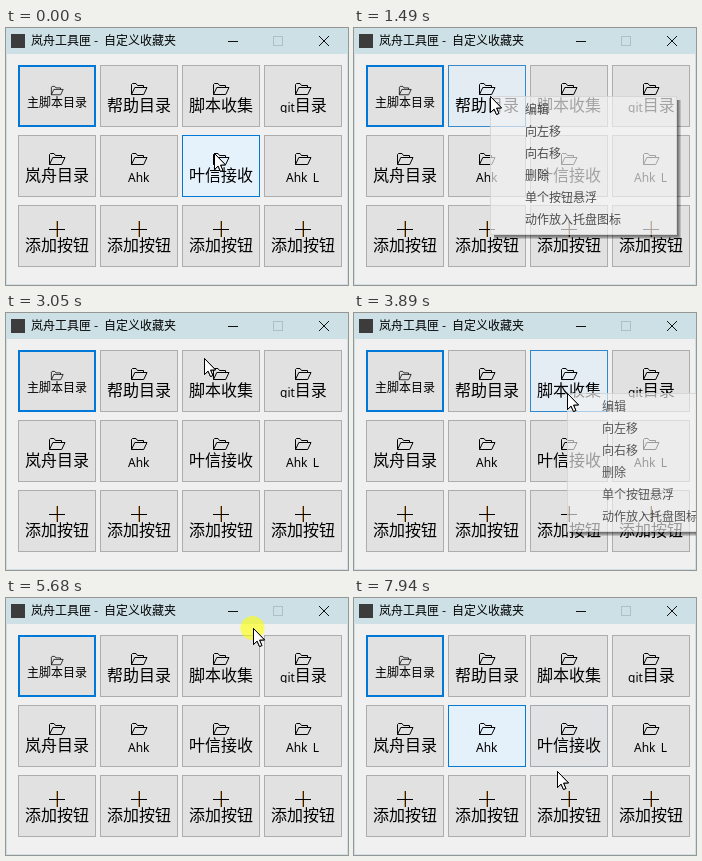
Write an HTML page with a canvas that moves like this. It is 342 px wide and 257 px high and loops after 8000 ms.

```html
<!DOCTYPE html>
<html lang="zh-CN">
<head>
<meta charset="utf-8">
<style>
html, body { margin: 0; width: 100%; height: 100%; overflow: hidden; }
canvas { display: block; }
</style>
</head>
<body>
<canvas id="stage" width="342" height="257"></canvas>
<script>
const ctx = document.getElementById('stage').getContext('2d');
const LOOP = 8000, STEP = 70;
const CJK = '"Noto Sans CJK SC", "Noto Sans CJK", sans-serif';
const LATIN = '"Noto Sans", sans-serif';
const LABELS = [
  ['主脚本目录', '帮助目录', '脚本收集', 'git目录'],
  ['岚舟目录', 'Ahk', '叶信接收', 'Ahk_L'],
  Array(4).fill('添加按钮')
];
const ITEMS = ['编辑', '向左移', '向右移', '删除', '单个按钮悬浮', '动作放入托盘图标'];
const BUTTON = { w: 78, h: 62 };
const MENU = { w: 187, h: 139, delay: 155 };

// Pointer glides between a few stops
const START = { x: 208, y: 125 };
const STOPS = [
  { from: 70, to: 490, x: 136, y: 68 },
  { from: 2100, to: 2520, x: 192, y: 26 },
  { from: 2920, to: 3330, x: 213, y: 92 },
  { from: 3480, to: 3550, x: 213, y: 80 },
  { from: 4450, to: 4800, x: 247, y: 22 },
  { from: 5130, to: 5460, x: 247, y: 30 },
  { from: 5950, to: 6290, x: 326, y: 200 },
  { from: 6360, to: 6780, x: 152, y: 157 },
  { from: 6850, to: 7060, x: 138, y: 148 },
  { from: 7800, to: 7940, x: 203, y: 173 }
];
// Clicks open and close the menu in turn
const CLICKS = [1230, 2650, 3640, 5680];

const clamp = v => Math.max(0, Math.min(1, v));
const mix = (a, b, p) => a + (b - a) * p;
const blend = (a, b, p) => `rgb(${a.map((v, i) => Math.round(mix(v, b[i], p)))})`;

function pointerAt(t) {
  let { x, y } = START;
  for (const stop of STOPS) {
    if (t < stop.from) break;
    const steps = (stop.to - stop.from) / STEP + 1;
    const p = clamp((Math.floor((t - stop.from) / STEP) + 1) / steps);
    x = mix(x, stop.x, p);
    y = mix(y, stop.y, p);
  }
  return { x: Math.round(x), y: Math.round(y) };
}

function menuAt(t) {
  const last = CLICKS.filter(click => click <= t).length - 1;
  const age = t - CLICKS[last] - MENU.delay;
  return last % 2 === 0 && age >= 0 ? { ...pointerAt(CLICKS[last]), age } : null;
}

const buttons = LABELS.flatMap((labels, row) => labels.map((label, col) =>
  ({ label, first: row + col === 0, plus: row === 2, x: 12 + col * 82, y: 37 + row * 70 })));

// A button warms up under the pointer and cools down more slowly afterwards
function updateHeat(t) {
  const dt = 10;
  buttons.forEach(b => b.heat = 0);
  for (let s = t - 600; s <= t; s += dt) {
    const p = pointerAt(s - STEP), blocked = menuAt(s);
    for (const b of buttons) {
      const over = !blocked && p.x >= b.x && p.x < b.x + BUTTON.w &&
        p.y >= b.y && p.y < b.y + BUTTON.h;
      b.heat = clamp(b.heat + (over ? dt / 150 : -dt / 350));
    }
  }
}

function rect(x, y, w, h, color) {
  ctx.fillStyle = color;
  ctx.fillRect(x, y, w, h);
}

function text(str, x, y, font, color = '#000') {
  ctx.font = font;
  ctx.fillStyle = color;
  ctx.fillText(str, x, y);
}

function stroke(points, color, close) {
  ctx.beginPath();
  points.forEach(([x, y]) => ctx.lineTo(x, y));
  if (close) ctx.closePath();
  ctx.lineWidth = 1;
  ctx.strokeStyle = color;
  ctx.stroke();
}

function drawWindow() {
  rect(0, 0, 342, 257, '#cfdfe4');
  rect(1, 26, 340, 230, '#f0f0f0');
  rect(0, 0, 342, 26, '#cce0e6');
  rect(5, 6, 14, 14, '#3c3c3c');
  const font = `12px ${CJK}`;
  text('岚舟工具匣', 25, 17, font);
  text('-', 88, 17, font);
  text('自定义收藏夹', 98, 17, font);
  rect(222, 13, 10, 1, '#111');
  ctx.lineWidth = 1;
  ctx.strokeStyle = '#b0bfc4';
  ctx.strokeRect(267.5, 8.5, 9, 9);
  stroke([[313, 8], [323, 18]], '#111');
  stroke([[323, 8], [313, 18]], '#111');
}

function drawFolder(x, y, scale) {
  ctx.save();
  ctx.translate(x, y);
  ctx.scale(scale, scale);
  stroke([[0.5, 11.5], [0.5, 1.5], [1.5, 0.5], [5, 0.5], [6.5, 2.5], [12.5, 2.5], [12.5, 4.5]], '#000');
  stroke([[0.5, 11.5], [3.8, 4.5], [16, 4.5], [12.7, 11.5]], '#000', true);
  ctx.restore();
}

function drawPlus(x, y) {
  rect(x - 1, y - 8, 1, 16, '#c89a60');
  rect(x, y - 8, 1, 16, '#33200c');
  rect(x - 8, y, 16, 1, '#000');
}

function drawLabel({ label, first, x, y }) {
  const [, latin, han] = label.match(/^(\w*)(.*)$/);
  const size = first ? 12 : 16;
  ctx.font = `12px ${LATIN}`;
  const latinWidth = ctx.measureText(latin).width;
  const left = Math.round(x + BUTTON.w / 2 - (latinWidth + han.length * size) / 2);
  // Descenders are cut off at the label's lower edge
  ctx.save();
  ctx.beginPath();
  ctx.rect(x, y, BUTTON.w, 48);
  ctx.clip();
  text(latin, left, y + 47, `12px ${LATIN}`);
  ctx.restore();
  text(han, left + latinWidth, y + (first ? 42 : 46), `${first ? 500 : 300} ${size}px ${CJK}`);
}

function drawButton(b) {
  const edge = b.first ? 2 : 1;
  const border = blend([173, 173, 173], [0, 120, 215], b.first ? 1 : b.heat);
  rect(b.x, b.y, BUTTON.w, BUTTON.h, border);
  rect(b.x + edge, b.y + edge, BUTTON.w - edge * 2, BUTTON.h - edge * 2,
    blend([225, 225, 225], [229, 241, 251], b.heat));
  if (b.plus) drawPlus(b.x + 39, b.y + 24);
  else if (b.first) drawFolder(b.x + 33, b.y + 21, 0.76);
  else drawFolder(b.x + 31, b.y + 18, 1);
  drawLabel(b);
}

function drawMenu({ x, y, age }) {
  const { w, h } = MENU;
  for (let i = 1; i <= 4; i++) {
    rect(x + w, y + 4, i, h - 4 + i, 'rgba(0,0,0,0.16)');
    rect(x + 4, y + h, w - 4, i, 'rgba(0,0,0,0.16)');
  }
  ctx.save();
  ctx.globalAlpha = clamp(0.25 + age * 0.004);
  rect(x, y, w, h, '#f2f2f2');
  ctx.lineWidth = 1;
  ctx.strokeStyle = '#cccccc';
  ctx.strokeRect(x + 0.5, y + 0.5, w - 1, h - 1);
  ITEMS.forEach((item, i) =>
    text(item, x + 35, y + 18 + Math.round(i * 21.9), `12px ${CJK}`));
  ctx.restore();
}

function drawPointer({ x, y }, clicking) {
  if (clicking) {
    ctx.beginPath();
    ctx.arc(x - 0.5, y, 12, 0, Math.PI * 2);
    ctx.fillStyle = 'rgba(255,255,0,0.6)';
    ctx.fill();
  }
  ctx.save();
  ctx.translate(x + 0.5, y + 0.5);
  stroke([[0, 0], [0, 16], [3.6, 12.6], [6, 18], [8.4, 17], [6, 11.6], [11, 11.4]], '#000', true);
  ctx.fillStyle = '#fff';
  ctx.fill();
  ctx.restore();
  ctx.save();
  ctx.translate(x + 0.5, y + 0.5);
  stroke([[0, 0], [0, 16], [3.6, 12.6], [6, 18], [8.4, 17], [6, 11.6], [11, 11.4]], '#000', true);
  ctx.restore();
}

function draw(t) {
  updateHeat(t);
  drawWindow();
  buttons.forEach(drawButton);
  const menu = menuAt(t);
  if (menu) drawMenu(menu);
  drawPointer(pointerAt(t), CLICKS.some(click => t >= click && t < click + 140));
}

const began = performance.now();
function tick() {
  draw((performance.now() - began) % LOOP);
  requestAnimationFrame(tick);
}
tick();
</script>
</body>
</html>
```
